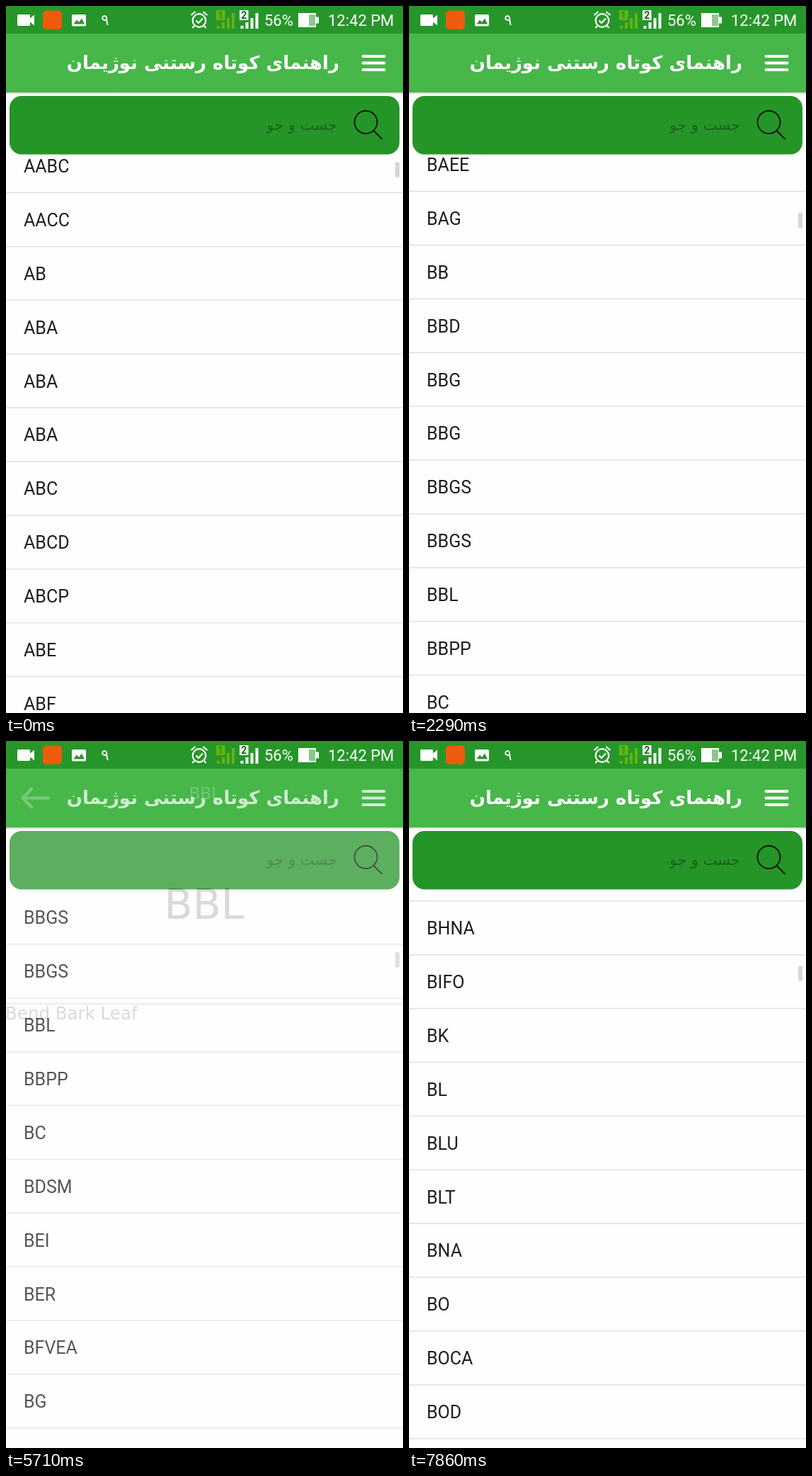
Recreate the animation shown at these times as an HTML page. Size 561 by 998 pixels, loop 8000 ms.

```html
<!DOCTYPE html>
<html lang="fa">
<head>
<meta charset="utf-8">
<title>Abbreviations</title>
<style>
  html, body { margin: 0; width: 100%; height: 100%; overflow: hidden; background: #fefdff; }
  svg { display: block; width: 100vw; height: 100vh; }
  .ui { font-family: Roboto, sans-serif; font-size: 22px; fill: #fff; }
  .row { font-family: Roboto, sans-serif; font-size: 25px; fill: #1d1d1f; }
  .page { font-family: "DejaVu Sans", sans-serif; fill: #707072; }
  .fa { font-family: "DejaVu Sans", sans-serif; direction: rtl; }
</style>
</head>
<body>
<svg viewBox="0 0 561 998" preserveAspectRatio="none">
  <defs>
    <clipPath id="listClip"><rect y="214" width="561" height="784"/></clipPath>
    <linearGradient id="shade" x2="0" y2="1">
      <stop stop-color="#8d9a8d" stop-opacity=".65"/>
      <stop offset="1" stop-color="#c8ccc8" stop-opacity="0"/>
    </linearGradient>
    <g id="bar">
      <rect y="121" width="561" height="5" fill="url(#shade)"/>
      <rect y="38" width="561" height="84" fill="#47b749"/>
    </g>
    <g id="bars">
      <rect x="1" y="28" width="4" height="4"/>
      <rect x="8" y="23" width="4" height="9"/>
      <rect x="15" y="17" width="4" height="15"/>
      <rect x="22" y="10" width="4" height="22"/>
    </g>
  </defs>

  <rect width="561" height="998" fill="#fefdff"/>

  <g clip-path="url(#listClip)">
    <rect id="press" width="561" height="75" fill="#dcdcdf"/>
    <g id="list"></g>
  </g>
  <rect id="thumb" x="550" width="6" height="21" fill="#babac2" fill-opacity=".6"/>

  <use href="#bar"/>
  <text class="fa" x="471" y="89" font-size="26" font-weight="700" fill="#fff">راهنمای کوتاه رستنی نوژیمان</text>
  <path d="M504.500 71H534.500M504.500 80.500H534.500M504.500 90H534.500" stroke="#fff" stroke-width="4" stroke-linecap="round"/>
  <rect x="5" y="127" width="551" height="82.500" rx="17" fill="#259528"/>
  <text class="fa" x="468" y="175" font-size="21" fill="#1a621c">جست و جو</text>
  <g fill="none" stroke="#0a120a" stroke-width="1.800">
    <circle cx="508.500" cy="164" r="16"/>
    <path d="M519.500 176L531.500 188"/>
  </g>

  <g id="detail">
    <rect y="39" width="561" height="959" fill="#fefdff"/>
    <use href="#bar"/>
    <path id="back" d="M60 80.500H24M36 68L23.500 80.500L36 93" fill="none" stroke="#fff" stroke-width="4.500" stroke-linecap="round" stroke-linejoin="round"/>
    <g class="page">
      <text x="281" y="82" font-size="23" text-anchor="middle" style="fill:#f4fbf4">BBL</text>
      <text x="280" y="251" font-size="58.500" text-anchor="middle">BBL</text>
      <text x="-1" y="393" font-size="24.500">Bend Bark Leaf</text>
    </g>
    <rect y="369.500" width="561" height="3" fill="#c3c6c8"/>
  </g>

  <g id="status">
    <rect width="561" height="39" fill="#27962a"/>
    <path d="M17.500 12H32.500Q34 12 34 13.500V17.500L40 12.500V27.500L34 22.500V26.500Q34 28 32.500 28H17.500Q16 28 16 26.500V13.500Q16 12 17.500 12Z" fill="#fff"/>
    <rect x="52" y="6.500" width="27" height="26.500" rx="5" fill="#ee5b0c"/>
    <rect x="93" y="12" width="20" height="16.500" rx="2" fill="#fff"/>
    <path d="M95.500 25.500L100 19.500L103 23L107 17.500L111 25.500Z" fill="#27962a"/>
    <text x="140" y="27" class="page" font-size="21" text-anchor="middle" style="fill:#fff">۹</text>

    <g fill="none" stroke="#fff" stroke-width="2.200">
      <circle cx="273" cy="20.500" r="9.300"/>
      <path d="M261.500 13L267.500 8M284.500 13L278.500 8M266 28L263.500 31M280 28L282.500 31"/>
      <path d="M268.500 20.500L272 24L278 17.500"/>
    </g>

    <g fill="#62b50d">
      <use href="#bars" x="297"/>
      <rect x="297" y="6" width="12.500" height="14"/>
    </g>
    <text class="ui" x="303" y="18" text-anchor="middle" style="font-size:14px;font-weight:700;fill:#27962a">1</text>
    <g fill="#fff">
      <use href="#bars" x="330.500"/>
      <rect x="330" y="6" width="12.500" height="14"/>
    </g>
    <text class="ui" x="336.200" y="18" text-anchor="middle" style="font-size:14px;font-weight:700;fill:#185f1a">2</text>

    <text class="ui" x="365" y="28">56%</text>
    <path d="M413 10H438V15.500H442V24.500H438V30H413Z" fill="#fff"/>
    <path d="M428 12H437V28H428Z" fill="#8cc78d"/>
    <text class="ui" x="455" y="28">12:42 PM</text>
  </g>
</svg>

<script>
const $ = id => document.getElementById(id);
const LOOP = 8000, RATE = 7, PITCH = 75.88, FIRST = 226, TAPPED = 74;

const terms = `AABC AACC AB ABA ABA ABA ABC ABCD ABCP ABE ABF
  ABG ABI ABP ABS AC ACC ACE ACF ACG
  ACGM ACMV ACNP ACPF ACRF ADAM ADEPT ADS AF AFA AG
  AGB AGM AGR AH AI AIC AJB AK AL ALA ALB ALS AM AMA AMS
  AN ANA ANB AP APA APG AR ARB ARS AS ASB AT ATB AV
  AVA AVA AVG AWI BA BA BAEE BAG BB BBD BBG BBG BBGS BBGS BBL BBPP BC
  BDSM BEI BER BFVEA BG BG BGAB BGC BGDF BGDF BGN BH BHC
  BHNA BIFO BK BL BLU BLT BNA BO BOCA BOD BOL BOP`.split(/\s+/);

// [step, value] tables; a step is one seventh of a second
const scroll = [
  [2, 0], [3, 260], [4, 860], [5, 1516], [6, 2150], [7, 2680], [8, 3080],
  [9, 3360], [10, 3540], [11, 3960], [12, 4534], [13, 4770], [14, 4900],
  [16, 5010], [18, 5050], [19, 5080], [20, 5150], [21, 5233], [22, 5310],
  [24, 5400], [26, 5440], [44, 5440], [45, 5570], [46, 5789.5], [47, 5950],
  [48, 6020], [49, 6020], [50, 6110], [51, 6290], [52, 6470], [53, 6620],
  [54, 6730], [55, 6791]
];
const cover = [[27, 0], [28, 0.6], [29, 1], [38, 1], [39, 0.7], [40, 0.25], [41, 0]];

function valueAt(table, step) {
  const next = table.findIndex(p => p[0] >= step);
  if (next === 0) return table[0][1];
  if (next < 0) return table[table.length - 1][1];
  const [a, from] = table[next - 1], [b, to] = table[next];
  return from + (to - from) * (step - a) / (b - a);
}

function add(parent, tag, attrs, text) {
  const el = document.createElementNS("http://www.w3.org/2000/svg", tag);
  for (const key in attrs) el.setAttribute(key, attrs[key]);
  if (text) el.textContent = text;
  parent.appendChild(el);
}

terms.forEach((term, i) => {
  const y = FIRST + i * PITCH;
  add($("list"), "text", { class: "row", x: 25, y: y + 9 }, term);
  add($("list"), "rect", { y: y + 36.8, width: 561, height: 1.5, fill: "#e1e1e5" });
});

function draw(step) {
  const top = valueAt(scroll, step);
  const shown = valueAt(cover, step);
  $("list").setAttribute("transform", `translate(0 ${-top})`);
  $("thumb").setAttribute("y", 220.5 + top / 70);
  $("press").setAttribute("y", FIRST + TAPPED * PITCH - top - 37.5);
  $("press").setAttribute("opacity", step === 27 || step === 28 ? 1 : 0);
  $("detail").setAttribute("opacity", shown);
  $("back").setAttribute("opacity", step === 35 ? 0.5 : 1);
}

const start = performance.now();
function tick() {
  const time = (performance.now() - start) % LOOP;
  draw(Math.floor((time + 5) * RATE / 1000) % (LOOP * RATE / 1000));
  requestAnimationFrame(tick);
}
tick();
</script>
</body>
</html>
```
